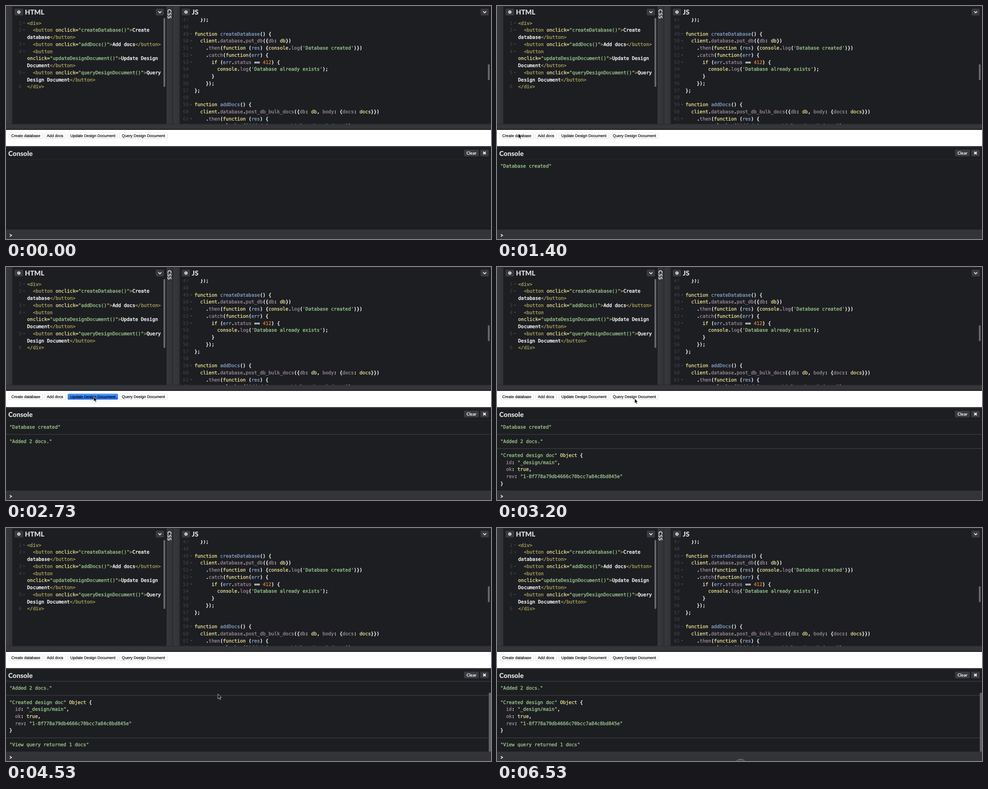
These frames come from a looping animation (1078x519 px, 6590 ms). An HTML page:

```html
<!DOCTYPE html>
<html lang="en">
<head>
<meta charset="utf-8">
<title>Code playground</title>
<style>
  html, body { margin: 0; width: 100%; height: 100%; overflow: hidden; background: #1d1e22; }
  svg { display: block; width: 1078px; height: 519px; }
  text { white-space: pre; text-rendering: geometricPrecision; }
  .code { font: 10.5px "DejaVu Sans Mono", monospace; }
  .title { font: 900 15px Lato, sans-serif; fill: #d8d8da; }
  .label {
    font: 8.75px "Liberation Sans", Arial, sans-serif; text-anchor: middle;
    fill: #000; stroke: #000; stroke-width: .2;
  }
  .small { font: 700 9.5px Lato, sans-serif; fill: #fff; text-anchor: middle; }
</style>
</head>
<body>
<svg id="stage" viewBox="0 0 1078 519">
  <defs>
    <linearGradient id="pressed" x2="0" y2="1">
      <stop offset="0" stop-color="#559ff6"/><stop offset="1" stop-color="#1b66e6"/>
    </linearGradient>
    <linearGradient id="strip">
      <stop offset="0" stop-color="#38393c"/><stop offset="1" stop-color="#313235"/>
    </linearGradient>
    <clipPath id="editorClip"><path d="M0 27H1078V263H0Z"/></clipPath>
    <clipPath id="consoleClip"><path d="M0 341H1078V498H0Z"/></clipPath>
  </defs>
</svg>
<script>
const LOOP = 6590, FRAMES = 99, STEP = LOOP / FRAMES;
const ROW = 15.74;
const COLORS = {
  t: '#b0a65c', a: '#f1e796', s: '#a2d093', w: '#fff',
  f: '#88a6cc', p: '#a08c9d', n: '#d9822f'
};
const stage = document.getElementById('stage');

function add(parent, tag, attrs = {}, content) {
  const node = document.createElementNS('http://www.w3.org/2000/svg', tag);
  for (const key in attrs) node.setAttribute(key, attrs[key]);
  if (content !== undefined) node.textContent = content;
  parent.append(node);
  return node;
}

const rect = (parent, x, y, width, height, fill, rx = 0) =>
  add(parent, 'rect', { x, y, width, height, fill, rx });

const show = (node, visible) => node.setAttribute('visibility', visible ? 'visible' : 'hidden');

// Each "~" starts a run; the letter after it picks the colour.
function codeLine(parent, x, middle, source) {
  const line = add(parent, 'text', { class: 'code', x, y: middle + 3.7 });
  for (const run of source.split('~').slice(1)) {
    const color = COLORS[run[0]];
    add(line, 'tspan', {
      fill: color, stroke: color, 'stroke-width': run[0] === 'w' ? .45 : .3
    }, run.slice(1));
  }
}

function lineNumber(parent, right, middle, number, folds) {
  add(parent, 'text', {
    class: 'code', x: right, y: middle + 3.7, fill: '#43444a', 'text-anchor': 'end'
  }, number);
  if (folds) add(parent, 'path', { d: `M${right + 3} ${middle - 1}h5l-2.5 2.6z`, fill: '#4b4c52' });
}

function iconButton(x, y, width, draw) {
  rect(stage, x, y, width, 15, '#3a3b40', 2);
  draw(x + width / 2, y + 7.5);
}

function gear(cx, cy) {
  const ring = { cx, cy, fill: 'none', stroke: '#eee' };
  add(stage, 'circle', { ...ring, r: 2.1, 'stroke-width': 1.8 });
  add(stage, 'circle', { ...ring, r: 3.2, 'stroke-width': 1.3, 'stroke-dasharray': '1.3 1.213' });
}

const chevron = (x, y) => add(stage, 'path', {
  d: `M${x - 3.4} ${y - 1.7}l3.4 3.4 3.4-3.4`, fill: 'none', stroke: '#eee', 'stroke-width': 1.7
});

const cross = (x, y) => add(stage, 'path', {
  d: `M${x - 2.8} ${y - 2.8}l5.6 5.6m0-5.6l-5.6 5.6`, stroke: '#fff', 'stroke-width': 2.2
});

// Page chrome
rect(stage, 0, 0, 1078, 519, '#1d1e22');
rect(stage, 0, 0, 14, 263, 'url(#strip)');
rect(stage, 357, 0, 14, 263, 'url(#strip)');
rect(stage, 371, 0, 1, 263, '#232427');
rect(stage, 372, 0, 14, 263, 'url(#strip)');
rect(stage, 0, 0, 1078, 1, '#2c2d30');
rect(stage, 0, 263, 1078, 12, '#343538');
rect(stage, 0, 262.5, 1078, 1, '#28292c');
rect(stage, 0, 274, 1078, 2, '#1c1d1f');
rect(stage, 0, 276, 1078, 36, '#fff');
rect(stage, 0, 312, 1078, 2.5, '#37383b');
rect(stage, 0, 341, 1078, 1, '#27282c');

iconButton(19, 6, 19, gear);
iconButton(333, 6, 18, chevron);
iconButton(391, 6, 18, gear);
iconButton(1055, 6, 18, chevron);
iconButton(1018, 320, 33, (x, y) => add(stage, 'text', { class: 'small', x, y: y + 3.4 }, 'Clear'));
iconButton(1054, 320, 19, cross);
add(stage, 'text', { class: 'title', x: 42, y: 19.4 }, 'HTML');
add(stage, 'text', { class: 'title', x: 413, y: 19.4 }, 'JS');
add(stage, 'text', { class: 'title', x: 5, y: 333.7 }, 'Console');
add(stage, 'text', {
  class: 'title', transform: 'translate(358.8 7) rotate(90)', style: 'font-size:12px'
}, 'CSS');

// Editors
const editors = add(stage, 'g', { 'clip-path': 'url(#editorClip)' });
const htmlLines = [
  '~t<div>',
  '~t  <button ~aonclick=~s"createDatabase()"~t>~wCreate',
  '~wdatabase~t</button>',
  '~t  <button ~aonclick=~s"addDocs()"~t>~wAdd docs~t</button>',
  '~t  <button',
  '~aonclick=~s"updateDesignDocument()"~t>~wUpdate Design',
  '~wDocument~t</button>',
  '~t  <button ~aonclick=~s"queryDesignDocument()"~t>~wQuery',
  '~wDesign Document~t</button>',
  '~t</div>'
];
let htmlNumber = 0;
htmlLines.forEach((source, row) => {
  const middle = 38 + row * ROW;
  codeLine(editors, 47, middle, source);
  if (/^~t *<(?!\/button)/.test(source)) lineNumber(editors, 34.5, middle, ++htmlNumber, row < 9);
});

const jsLines = [
  '~w  });',
  '',
  '~afunction ~fcreateDatabase~w() {',
  '~a  client~w.~pdatabase~w.~pput_db~w({~pdb~w: ~adb~w})',
  '~w    .~pthen~w(~afunction ~w(~fres~w) {~aconsole~w.~plog~w(~s\'Database created\'~w)})',
  '~w    .~pcatch~w(~afunction~w(~ferr~w) {',
  '~a      if ~w(~ferr~w.~pstatus~w == ~n412~w) {',
  '~a        console~w.~plog~w(~s\'Database already exists\'~w);',
  '~w      }',
  '~w    });',
  '~w};',
  '',
  '~afunction ~faddDocs~w() {',
  '~a  client~w.~pdatabase~w.~ppost_db_bulk_docs~w({~pdb~w: ~adb~w, ~pbody~w: {~pdocs~w: ~adocs~w}})',
  '~w    .~pthen~w(~afunction ~w(~fres~w) {',
  '~a      console~w.~plog~w(~s"Added "~w + ~fres~w.~pobj~w.~plength~w + ~s" docs."~w);'
];
jsLines.forEach((source, row) => {
  const middle = 30.5 + row * ROW;
  codeLine(editors, 419, middle, source);
  lineNumber(editors, 406, middle, 47 + row, /\{$|put_db|then/.test(source));
});
rect(stage, 350, 27, 4, 153, '#66676a', 1);
rect(stage, 1071, 130, 4, 35, '#66676a', 1);

// Page buttons
const buttons = [
  ['Create database', 6, 76], ['Add docs', 85, 48],
  ['Update Design Document', 137, 112], ['Query Design Document', 252, 107]
].map(([name, x, width]) => {
  rect(stage, x, 282.4, width, 13.2, '#cecece', 3);
  rect(stage, x + .6, 282.7, width - 1.2, 12.1, '#fff', 2.6);
  const pressed = rect(stage, x, 282, width, 13.3, 'url(#pressed)', 2.6);
  add(stage, 'text', { class: 'label', x: x + width / 2, y: 291.9 }, name);
  return pressed;
});
const focusRing = add(stage, 'rect', {
  x: 252.5, y: 282.3, width: 105.8, height: 12.8, rx: 2.6,
  fill: 'none', stroke: '#83aee4', 'stroke-width': 1.1
});

// Console
const consoleArea = add(stage, 'g', { 'clip-path': 'url(#consoleClip)' });
const logList = add(consoleArea, 'g');
const logs = [
  { at: 1130, lines: ['~s"Database created"'] },
  { at: 2060, lines: ['~s"Added 2 docs."'] },
  { at: 2860, lines: [
    '~s"Created design doc" ~aObject ~w{',
    '~p  id~w: ~s"_design/main"~w,',
    '~p  ok~w: ~atrue~w,',
    '~p  rev~w: ~s"1-8f778a79db4666c70bcc7a84c8bd845e"',
    '~w}'
  ] },
  { at: 3655, lines: ['~s"View query returned 1 docs"'] }
];
let logTop = 341;
logs.forEach((log, index) => {
  log.node = add(logList, 'g');
  if (index) rect(log.node, 0, logTop, 1078, 1, '#46474b');
  log.lines.forEach((source, row) => codeLine(log.node, 7.5, logTop + 15.3 + row * ROW, source));
  logTop += 31.5 + (log.lines.length - 1) * ROW;
});
const consoleScroll = rect(stage, 1073, 367, 5, 131, '#626366', 1);
rect(stage, 0, 498, 1078, 21, '#333438');
add(stage, 'path', { d: 'M8.5 508.4l4 2.6-4 2.6', fill: 'none', stroke: '#fff', 'stroke-width': 1.5 });

const badge = add(stage, 'g');
add(badge, 'circle', { cx: 541.5, cy: 527, r: 12, fill: '#292a2d', stroke: '#a5a5a8' });
add(badge, 'circle', { cx: 541.5, cy: 527, r: 9.5, fill: 'none', stroke: '#77787b' });

// Pointer
const pointer = add(stage, 'path', {
  d: 'M0 0V10.6L2.5 8.4 4.2 12.3 6 11.5 4.4 7.7H7.6Z',
  fill: '#000', stroke: '#fff', 'stroke-width': .8
});
const route = [
  [60, 500, 470], [600, 62, 299], [860, 45, 284], [1330, 45, 284],
  [1930, 117, 287], [2330, 117, 287], [2660, 195, 289], [2930, 195, 289],
  [3200, 306, 293], [3460, 309, 289], [3660, 309, 289], [3795, 320, 290],
  [4200, 322, 291], [4930, 676, 478]
];
const presses = [[860, 1055], [1920, 2060], [2655, 2790], [3455, 3655]];
const within = (time, [from, to]) => time >= from && time < to;

function pointerAt(time) {
  const next = route.findIndex(stop => stop[0] > time);
  if (next < 1) return route[next < 0 ? route.length - 1 : 0].slice(1);
  const [t0, x0, y0] = route[next - 1], [t1, x1, y1] = route[next];
  const u = (time - t0) / (t1 - t0), ease = u * u * (3 - 2 * u);
  return [x0 + (x1 - x0) * ease, y0 + (y1 - y0) * ease];
}

function render(elapsed) {
  const frame = Math.floor((elapsed % LOOP + 4) / STEP) % FRAMES;
  const time = frame * STEP;
  const [x, y] = pointerAt(time);
  pointer.setAttribute('transform', `translate(${x} ${y})`);
  show(pointer, within(time, [60, 4980]));
  buttons.forEach((pressed, index) => show(pressed, within(time, presses[index])));
  show(focusRing, within(time, [4980, 6320]));
  logs.forEach(log => show(log.node, time >= log.at));
  const scrolled = time >= logs[3].at;
  logList.setAttribute('transform', `translate(0 ${scrolled ? -31.5 : 0})`);
  show(consoleScroll, scrolled);
  show(badge, time >= 6450);
}

const start = performance.now();
function tick() {
  render(performance.now() - start);
  requestAnimationFrame(tick);
}
tick();
</script>
</body>
</html>
```
